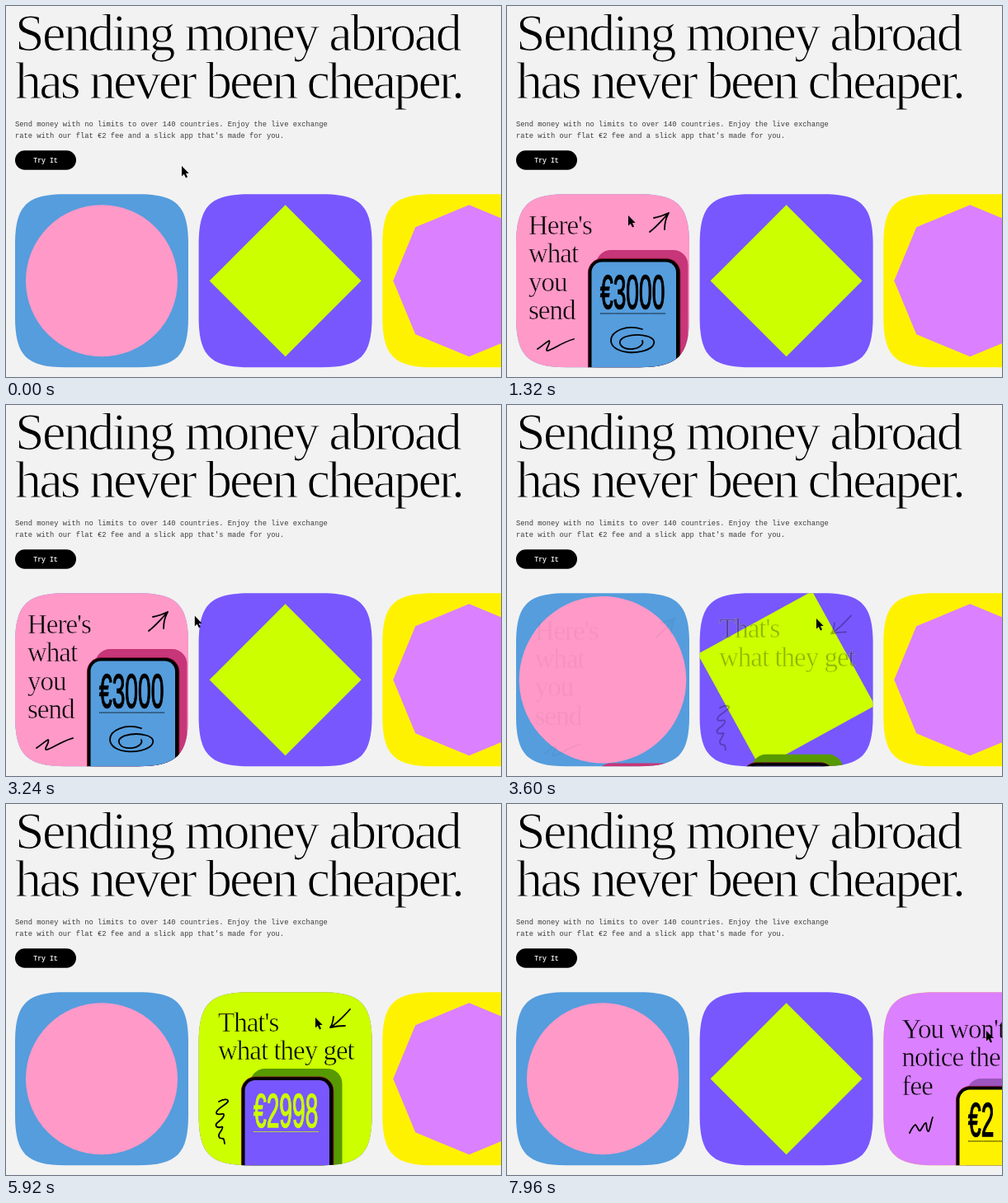
An HTML page that plays this animation: 600 by 450 pixels, repeating every 8 s.

```html
<!DOCTYPE html>
<html lang="en">
<head>
<meta charset="utf-8">
<title>Sending money abroad</title>
<style>
  html, body { margin: 0; width: 100%; height: 100%; overflow: hidden; background: #f2f2f2; }
  svg { display: block; }
  .head { font: 64px "Liberation Serif", serif; stroke: #f2f2f2; stroke-width: 1.2px; }
  .mono { font: 8.78px "Liberation Mono", monospace; fill: #3c3c3c; }
  .btn { font: 8.2px "Liberation Mono", monospace; fill: #fff; stroke: #fff; stroke-width: .2px; }
  .card { font: 33px "Liberation Serif", serif; letter-spacing: -1px; stroke-width: .6px; }
  .sum { font: 57.5px "Liberation Sans", sans-serif; stroke-width: 1.5px; }
  .ink { fill: none; stroke: #000; stroke-width: 1.8; stroke-linecap: round; stroke-linejoin: round; }
</style>
</head>
<body>
<svg id="stage" width="600" height="450" viewBox="0 0 600 450">
  <rect width="600" height="450" fill="#f2f2f2"/>
  <text class="head" x="11" y="54" letter-spacing="-2.55">Sending money abroad</text>
  <text class="head" x="11" y="111.500" letter-spacing="-2.85">has never been cheaper.</text>
  <text class="mono" x="11" y="146.200">Send money with no limits to over 140 countries. Enjoy the live exchange</text>
  <text class="mono" x="11" y="160.200">rate with our flat €2 fee and a slick app that's made for you.</text>
  <rect x="11" y="175.200" width="74" height="23.500" rx="11.700"/>
  <text class="btn" x="48" y="190" text-anchor="middle">Try It</text>
  <g id="cards"></g>
  <path id="cursor" d="M0 0V12.500L2.800 9.900L5 14.500L7 13.600L5 9.100H8.700Z"/>
</svg>
<script>
const LOOP = 8000, R = 92, CY = 333.3;
const SHAPE_IN = 1200, SHAPE_OUT = 580;
const COPY_MS = 490, COPY_DELAY = 80, PHONE_DROP = 145;

const polygon = n => 'M' + Array.from({ length: n }, (_, i) => {
  const a = 2 * Math.PI * i / n;
  return `${R * Math.sin(a)} ${-R * Math.cos(a)}`;
}).join('L') + 'Z';

const circle = `M${-R} 0A${R} ${R} 0 0 1 ${R} 0A${R} ${R} 0 0 1 ${-R} 0Z`;

// Rounded square with soft, continuous corners
function squircle(h = 105, s = 44, c = 91) {
  return `M${-h} ${-s}C${-h} ${-c} ${-c} ${-h} ${-s} ${-h}H${s}` +
    `C${c} ${-h} ${h} ${-c} ${h} ${-s}V${s}C${h} ${c} ${c} ${h} ${s} ${h}H${-s}` +
    `C${-c} ${h} ${-h} ${c} ${-h} ${s}Z`;
}

const cards = [
  {
    cx: 116, back: '#559ddd', front: '#ff99c8', shape: circle,
    on: 300, off: 3240, grow: 1, shift: [8, 8],
    text: [26, 277, 34.3, ["Here's", 'what', 'you', 'send']],
    ink: 'M173 274C181 268 188 260 196 251M178 257Q188 255 196 251Q191 260 191 271' +
      'M37 416C42 413 47 408 51 406C54 408 45 418 49 418C56 417 66 408 81 404',
    phone: [98, 306, 10, 10], shade: '#c73678',
    sum: '€3000', sumColor: '#000',
    extra: 'M164 392C145 386 126 394 126 406C127 423 164 424 176 413C186 401 161 396 144 401' +
      'C130 406 138 417 152 416C161 415 166 410 164 406'
  },
  {
    cx: 338.6, back: '#7857ff', front: '#ccff00', shape: polygon(4),
    on: 3424, off: 6268, grow: 1.2, shift: [0, 9],
    text: [257, 276, 34.3, ["That's", 'what they get']],
    ink: 'M417 249C409 258 401 266 393 271M397 258Q396 267 393 271Q402 269 411 269' +
      'M258 361C263 358 270 357 269 361C267 365 254 370 255 375C257 379 265 373 264 378' +
      'C262 385 252 386 255 391C259 395 264 388 262 394C260 399 256 401 259 405C263 407 264 403 265 412',
    phone: [285, 330.500, 11, 9.500], shade: '#579900',
    sum: '€2998', sumColor: '#ccff00'
  },
  {
    cx: 561.3, back: '#fff200', front: '#db80ff', shape: polygon(8),
    on: 6392, off: Infinity, grow: .9, shift: [8, 8],
    text: [478.500, 284, 34.3, ["You won't", 'notice the', 'fee']],
    ink: 'M488 399C491 393 493 390 495 389C497 390 499 398 501 396C504 392 506 386 508 387' +
      'C509 390 508 397 511 397C513 394 514 385 516 380',
    phone: [544, 342, 13, 9], shade: '#9b55bd',
    sum: '€2', sumColor: '#000'
  }
];

function phone(c) {
  const [x, y, dx, dy] = c.phone, w = 111.500;
  return `<g class="phone">
    <rect x="${x + dx}" y="${y - dy}" width="${w}" height="200" rx="18" fill="${c.shade}"/>
    <rect x="${x + .4}" y="${y + .4}" width="${w}" height="200" rx="17" stroke="#8a1030" stroke-width=".8"/>
    <rect x="${x + 4.5}" y="${y + 4.5}" width="${w - 9}" height="200" rx="12.500" fill="${c.back}"/>
    <text class="sum" fill="${c.sumColor}" stroke="${c.sumColor}"
      transform="translate(${x + 15} ${y + 61}) scale(.49 1)">${c.sum}</text>
    <path d="M${x + 15} ${y + 67}h79" stroke="${c.sumColor}" stroke-dasharray="1.500 .6"/>
    ${c.extra ? `<path class="ink" d="${c.extra}"/>` : ''}
  </g>`;
}

function build(c, i) {
  const [x, y, step, lines] = c.text;
  const line = (s, k) => `<text class="card" stroke="${c.front}" x="${x}" y="${y + k * step}">${s}</text>`;
  return `<clipPath id="clip${i}"><path d="${squircle()}" transform="translate(${c.cx} ${CY})"/></clipPath>
  <g clip-path="url(#clip${i})" id="card${i}">
    <rect x="${c.cx - 106}" y="227" width="212" height="213" fill="${c.back}"/>
    <path class="shape" d="${c.shape}" fill="${c.front}"/>
    <g class="copy">
      ${lines.map(line).join('')}
      <path class="ink" d="${c.ink}"/>
    </g>
    ${phone(c)}
  </g>`;
}

document.getElementById('cards').innerHTML = cards.map(build).join('');
cards.forEach((c, i) => {
  const g = document.getElementById('card' + i);
  for (const part of ['shape', 'copy', 'phone']) c[part + 'El'] = g.querySelector('.' + part);
});
const cursor = document.getElementById('cursor');

const clamp = v => Math.min(1, Math.max(0, v));
const bez = (a, b, s) => 3 * a * s * (1 - s) ** 2 + 3 * b * s * s * (1 - s) + s ** 3;

// Same curve as the CSS "ease" keyword
function ease(u) {
  if (u <= 0 || u >= 1) return clamp(u);
  let lo = 0, hi = 1;
  for (let i = 0; i < 24; i++) {
    const mid = (lo + hi) / 2;
    if (bez(.25, .25, mid) < u) lo = mid; else hi = mid;
  }
  return bez(.1, 1, lo);
}

const inOut = u => u < .5 ? 4 * u ** 3 : 1 - 4 * (1 - u) ** 3;
const hover = (c, t, msIn, msOut, delay = 0) =>
  ease((t - c.on - delay) / msIn) - ease((t - c.off) / msOut);

const start = [213, 194];
const moves = [[40, 680, 147, 254], [2950, 3600, 375, 259], [5930, 6580, 581, 275]];

function pointer(t) {
  let [x, y] = start;
  for (const [a, b, tx, ty] of moves) {
    const k = inOut(clamp((t - a) / (b - a)));
    x += (tx - x) * k;
    y += (ty - y) * k;
  }
  return [x, y];
}

function draw(t) {
  for (const c of cards) {
    const p = hover(c, t, SHAPE_IN, SHAPE_OUT);
    const q = hover(c, t, COPY_MS, COPY_MS, COPY_DELAY);
    const rest = 1 - q;
    c.shapeEl.setAttribute('transform',
      `translate(${c.cx} ${CY}) rotate(${90 * p}) scale(${1 + c.grow * p})`);
    c.copyEl.setAttribute('transform', `translate(${c.shift[0] * rest} ${c.shift[1] * rest})`);
    c.copyEl.setAttribute('opacity', q);
    c.phoneEl.setAttribute('transform', `translate(0 ${PHONE_DROP * rest})`);
  }
  cursor.setAttribute('transform', `translate(${pointer(t).join(' ')})`);
}

const t0 = performance.now();
function tick() {
  draw((performance.now() - t0) % LOOP);
  requestAnimationFrame(tick);
}
tick();
</script>
</body>
</html>
```
